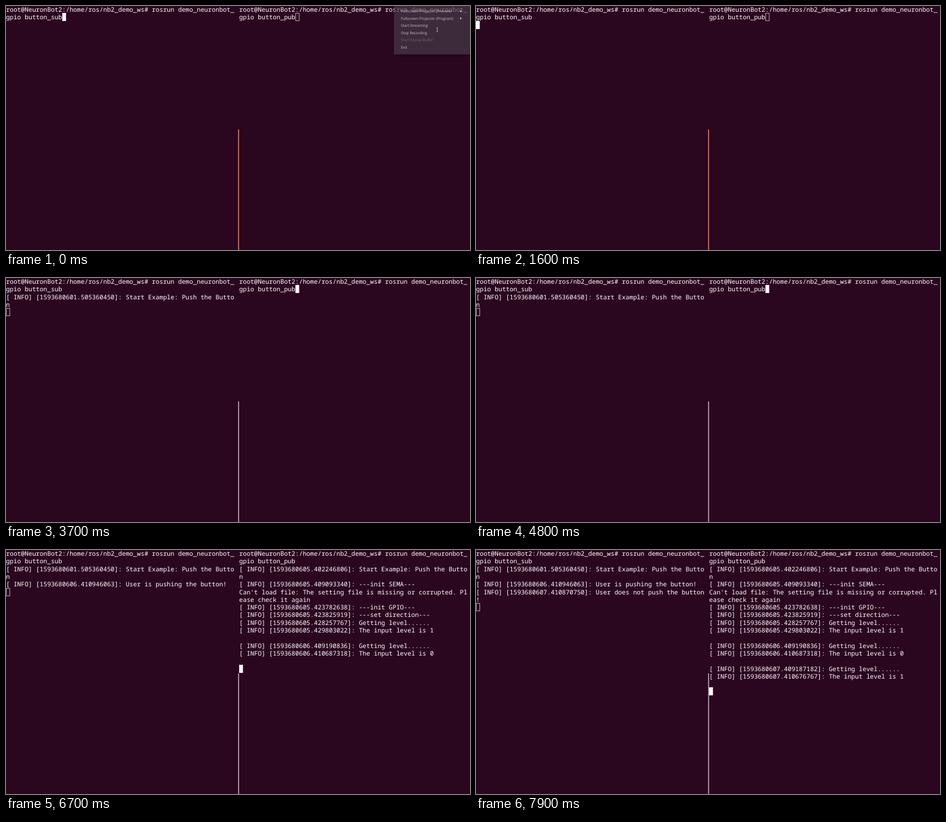
An HTML page with a canvas for the animation above (8000 ms loop, 800x423 px).

```html
<!DOCTYPE html>
<html lang="en">
<head>
<meta charset="utf-8">
<title>Button demo</title>
<style>
  html, body { margin: 0; width: 100%; height: 100%; overflow: hidden; background: #2b071f; }
  canvas { display: block; }
</style>
</head>
<body>
<canvas id="stage" width="800" height="423"></canvas>
<script>
const ctx = document.getElementById('stage').getContext('2d');
const LOOP = 8000, COLS = 61, CELL_W = 6.45, CELL_H = 13.3, BASELINE = 10;
const BG = '#2b071f';

const LEFT_ENTER = 1500, FOCUS = 2400, RIGHT_ENTER = 5400, BLINK = 600;

const prompt = name => `root@NeuronBot2:/home/ros/nb2_demo_ws# rosrun demo_neuronbot_gpio ${name}`;
const info = (stamp, text) => `[ INFO] [159368060${stamp}]: ${text}\n`;
const level = (asked, got, value) =>
  info(asked, 'Getting level......') + info(got, `The input level is ${value}`) + '\n';

// Each entry: time it appears, text it appends.
const leftLog = [
  [0, prompt('button_sub')],
  [LEFT_ENTER, '\n'],
  [1800, info('1.505360450', 'Start Example: Push the Button')],
  [6700, info('6.410946063', 'User is pushing the button!')],
  [7700, info('7.410870750', 'User does not push the button!')]
];
const rightLog = [
  [0, prompt('button_pub')],
  [RIGHT_ENTER, '\n'],
  [5700, info('5.402246806', 'Start Example: Push the Button') +
    info('5.409093340', '---init SEMA---') +
    "Can't load file: The setting file is missing or corrupted. Please check it again\n" +
    info('5.423782638', '---init GPIO---') +
    info('5.423825919', '---set direction---') +
    level('5.428257767', '5.429803022', 1)],
  [6700, level('6.409190836', '6.410687318', 0)],
  [7700, level('7.409187182', '7.410676767', 1)]
];

function wrap(text) {
  const rows = [];
  for (const line of text.split('\n')) {
    let i = 0;
    do {
      rows.push(line.slice(i, i + COLS));
      i += COLS;
    } while (i < line.length);
  }
  return rows;
}

function drawTerminal(x, log, t, focused, lit) {
  const rows = wrap(log.filter(e => e[0] <= t).map(e => e[1]).join(''));
  ctx.font = '10.75px "Noto Sans Mono", "DejaVu Sans Mono", monospace';
  ctx.textRendering = 'geometricPrecision';
  ctx.fillStyle = '#fff';
  rows.forEach((row, i) => ctx.fillText(row, x, i * CELL_H + BASELINE));

  const last = rows.length - 1;
  const cx = Math.round(x + rows[last].length * CELL_W);
  const cy = Math.round(last * CELL_H);
  if (!focused) {
    ctx.strokeStyle = '#b5a9b1';
    ctx.lineWidth = 1;
    ctx.strokeRect(cx + 0.5, cy - 0.5, 6, 13);
  } else if (lit) {
    ctx.fillRect(cx, cy - 1, 6.5, 14);
  }
}

const blinkOn = since => Math.floor(since / BLINK) % 2 === 0;

function leftLit(t) {
  return t < 100 || blinkOn(t - (t < LEFT_ENTER ? 600 : LEFT_ENTER));
}

function drawDivider(t) {
  const p = Math.min(1, Math.max(0, (t - 2200) / 200));
  const mix = (a, b) => Math.round(a + (b - a) * p);
  ctx.fillStyle = `rgb(${mix(200, 160)},${mix(98, 140)},${mix(62, 154)})`;
  ctx.fillRect(400, 214, 2, 209);
}

const menu = [
  ['Fullscreen Projector (Preview)', true],
  ['Fullscreen Projector (Program)', true],
  ['Start Streaming'],
  ['Stop Recording'],
  ['Start Replay Buffer'],
  ['Exit']
];

function drawMenu(alpha) {
  ctx.save();
  ctx.globalAlpha = alpha * 0.4;
  ctx.fillStyle = '#12040d';
  ctx.fillRect(674, 84, 126, 4);
  ctx.globalAlpha = alpha * 0.72;
  ctx.fillStyle = '#453844';
  ctx.fillRect(669, 0, 131, 84);

  ctx.globalAlpha = alpha;
  ctx.font = '6.4px "Open Sans", "Noto Sans", sans-serif';
  menu.forEach(([label, arrow], i) => {
    const y = 9 + i * 12.5;
    ctx.fillStyle = i === 4 ? '#706370' : '#cbc4ca';
    ctx.fillText(label, 681, y + 2.4);
    if (arrow) {
      ctx.beginPath();
      ctx.moveTo(783, y - 2);
      ctx.lineTo(786, y);
      ctx.lineTo(783, y + 2);
      ctx.fill();
    }
  });
  ctx.fillStyle = '#b9b0b8';
  ctx.fillRect(743, 38, 1, 6);
  ctx.fillRect(742, 37.5, 3, 0.7);
  ctx.fillRect(742, 43.8, 3, 0.7);
  ctx.restore();
}

function draw(t) {
  ctx.fillStyle = BG;
  ctx.fillRect(0, 0, 800, 423);
  drawDivider(t);
  const onRight = t >= FOCUS;
  drawTerminal(0, leftLog, t, !onRight, leftLit(t));
  drawTerminal(402, rightLog, t, onRight, blinkOn(t - (t < RIGHT_ENTER ? FOCUS : RIGHT_ENTER)));
  const fade = t < 100 ? 1 : 1 - Math.ceil((t - 99) / 100) / 3;
  if (fade > 0.01) drawMenu(fade);
}

const start = performance.now();
function tick() {
  draw((performance.now() - start) % LOOP);
  requestAnimationFrame(tick);
}
tick();
</script>
</body>
</html>
```
